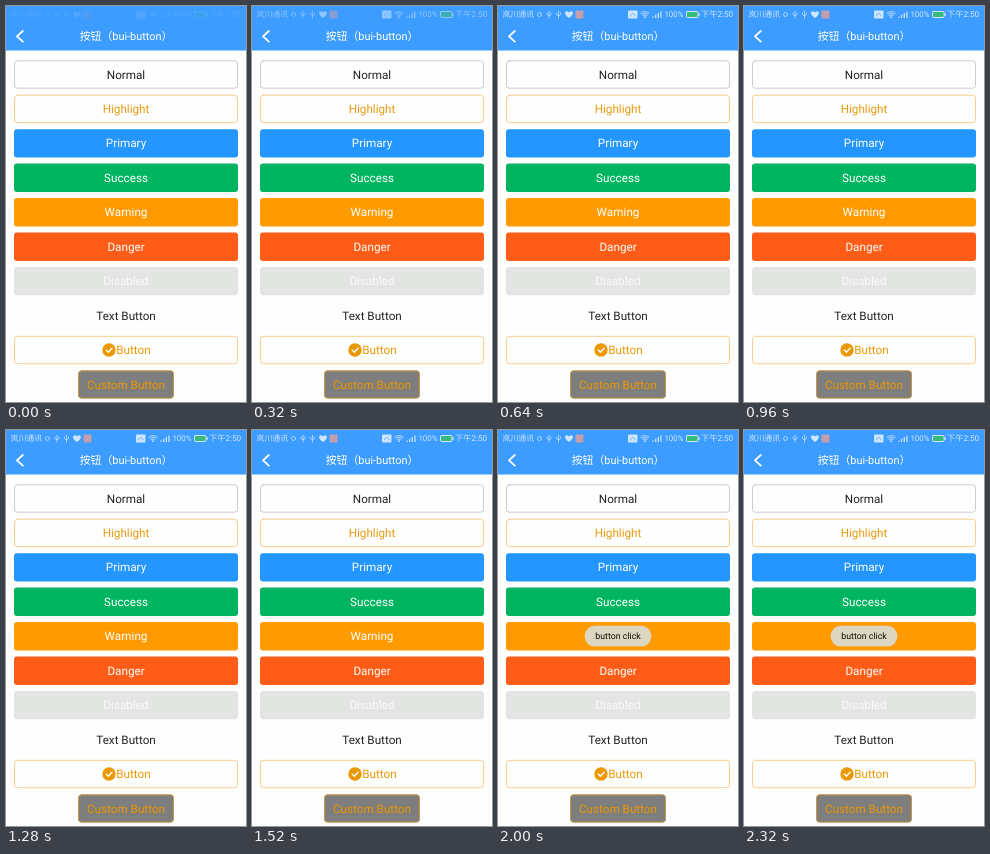
An HTML page with a canvas for the animation above (2400 ms loop, 240 px wide and 396 px high).

```html
<!DOCTYPE html>
<html lang="zh-CN">
<head>
<meta charset="utf-8">
<title>Buttons</title>
<style>
html, body { margin: 0; width: 100%; height: 100%; overflow: hidden; background: #fff; }
canvas { display: block; width: 240px; height: 396px; }
</style>
</head>
<body>
<canvas id="stage"></canvas>
<script>
const W = 240, H = 396, LOOP = 2400, STEP = 80;
// The TC face centres full-width brackets in their cell.
const FONT = 'Roboto, "Noto Sans CJK TC", "Noto Sans CJK SC", "Noto Sans CJK", sans-serif';
const canvas = document.getElementById('stage');
const ctx = canvas.getContext('2d');
const dpr = window.devicePixelRatio || 1;
canvas.width = W * dpr;
canvas.height = H * dpr;
ctx.scale(dpr, dpr);
ctx.textRendering = 'geometricPrecision';

const buttons = [
  { label: 'Normal', color: '#222', border: '#cbcbcb' },
  { label: 'Highlight', color: '#e69a0c', border: '#f5cf8c' },
  { label: 'Primary', color: '#fff', fill: '#2396ff' },
  { label: 'Success', color: '#fff', fill: '#00b460' },
  { label: 'Warning', color: '#fff', fill: '#ff9b00' },
  { label: 'Danger', color: '#fff', fill: '#ff5d17' },
  { label: 'Disabled', color: '#fafafa', fill: '#e3e5e3' },
  { label: 'Text Button', color: '#222' },
  { label: 'Button', color: '#ec9800', border: '#f5cf8c', icon: true },
  { label: 'Custom Button', color: '#ec9800', fill: '#7e7e7e', border: '#c8963f', x: 72, w: 96 }
];

const clamp = v => Math.max(0, Math.min(1, v));

function text(str, x, y, size, color, align = 'center') {
  ctx.font = `${size}px ${FONT}`;
  ctx.fillStyle = color;
  ctx.textAlign = align;
  ctx.textBaseline = 'alphabetic';
  ctx.fillText(str, x, y + size * 0.35);
}

function box(x, y, w, h, r, fill, border) {
  ctx.beginPath();
  ctx.roundRect(x, y, w, h, r);
  if (fill) {
    ctx.fillStyle = fill;
    ctx.fill();
  }
  if (border) {
    ctx.strokeStyle = border;
    ctx.lineWidth = 1;
    ctx.stroke();
  }
}

function line(points, color, width) {
  ctx.beginPath();
  points.forEach(([x, y]) => ctx.lineTo(x, y));
  ctx.strokeStyle = color;
  ctx.lineWidth = width;
  ctx.lineCap = ctx.lineJoin = 'round';
  ctx.stroke();
}

function arc(x, y, r, from, to, width) {
  ctx.beginPath();
  ctx.arc(x, y, r, from, to);
  ctx.strokeStyle = '#fff';
  ctx.lineWidth = width;
  ctx.stroke();
}

function disc(x, y, r, color) {
  ctx.beginPath();
  ctx.arc(x, y, r, 0, Math.PI * 2);
  ctx.fillStyle = color;
  ctx.fill();
}

function usb(x) {
  line([[x, 5], [x, 12]], '#fff', 0.7);
  line([[x - 2, 7], [x - 2, 8.5], [x, 10], [x + 2, 8.5], [x + 2, 7]], '#fff', 0.7);
}

function heart(x, y) {
  ctx.beginPath();
  ctx.moveTo(x, y + 3.5);
  ctx.bezierCurveTo(x - 7, y - 1, x - 3, y - 5.5, x, y - 2);
  ctx.bezierCurveTo(x + 3, y - 5.5, x + 7, y - 1, x, y + 3.5);
  ctx.fillStyle = '#fff';
  ctx.fill();
}

function wifi(x, y) {
  for (const r of [2.5, 4.3, 6.1]) arc(x, y, r, -Math.PI * 0.75, -Math.PI * 0.25, 0.8);
  disc(x, y - 0.3, 0.9, '#fff');
}

function statusBar(alpha) {
  ctx.globalAlpha = alpha;
  text('岚川通讯', 4.5, 8.5, 7.9, '#fff', 'left');
  arc(41.5, 8.5, 2, 0, Math.PI * 2, 0.7);
  usb(51);
  usb(60.5);
  heart(71, 8.5);
  box(77.5, 4.5, 8, 8, 1, '#f0a090');

  box(130, 4.5, 9.5, 8, 1, '#fff');
  line([[132, 10], [134.7, 7], [137.5, 10]], '#3d9cff', 0.9);
  wifi(147, 11.5);
  for (let i = 0; i < 4; i++) {
    const h = 1.5 + i * 1.7;
    box(154.5 + i * 2.6, 12 - h, 1.2, h, 0, '#fff');
  }
  text('100%', 166.4, 8.5, 7.9, '#fff', 'left');
  box(188.5, 5.5, 11.5, 6, 1, '#35c455', '#fff');
  box(200.6, 7.2, 1.2, 2.6, 0, '#fff');
  text('下午2:50', 203, 8.6, 8.2, '#fff', 'left');
  ctx.globalAlpha = 1;
}

function header(alpha) {
  box(0, 0, W, 44.5, 0, '#3d9cff');
  statusBar(alpha);
  line([[16.8, 25], [11, 30.3], [16.8, 35.7]], '#fff', 1.8);
  text('按钮（bui-button）', 120, 30.3, 10.9, '#fff');
}

function button({ label, color, fill, border, icon, x = 8, w = 224 }, i) {
  const cy = 68.5 + i * 34.44;
  const inset = border ? 0.5 : 0;
  box(x + inset, cy - 14.2 + inset, w - inset * 2, 28.4 - inset * 2, 3, fill, border);
  if (icon) {
    disc(103, cy, 6.7, '#ec9800');
    line([[100.2, cy], [102.4, cy + 2.2], [106, cy - 1.8]], '#fff', 1.4);
  }
  text(label, icon ? 127.5 : 120, cy, 11.7, color);
}

function toast(level) {
  ctx.globalAlpha = level;
  box(86.7, 195.8, 66.6, 20.8, 10, '#ddd6c1');
  ctx.globalAlpha = 1;
  text('button click', 120, 206.3, 8.8, '#0c0b09');
}

function draw(now) {
  const t = Math.floor((now % LOOP) / STEP) * STEP;
  ctx.fillStyle = '#fefefe';
  ctx.fillRect(0, 0, W, H);
  header(0.1 + 0.65 * clamp(t / 640));
  buttons.forEach(button);
  if (t >= 1600) toast(0.7 + 0.3 * clamp((t - 1600) / 320));
}

const start = performance.now();
function frame() {
  draw(performance.now() - start);
  requestAnimationFrame(frame);
}
frame();
</script>
</body>
</html>
```
